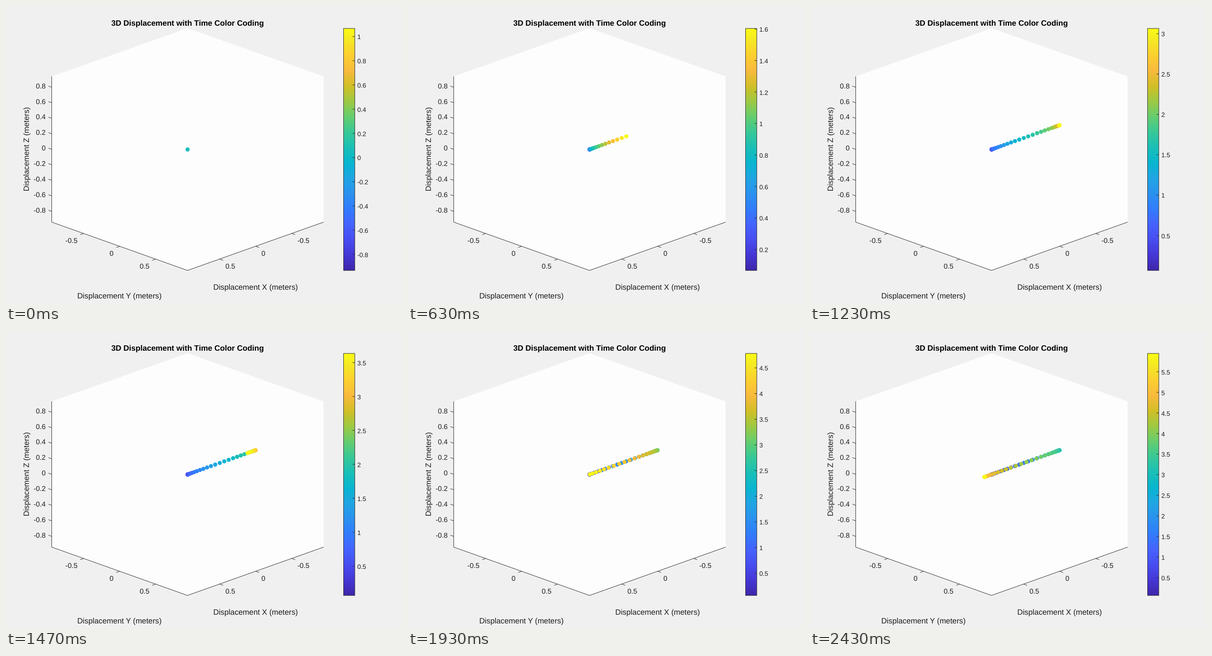
Recreate the animation shown at these times as an HTML page. Size 864 px wide and 648 px high, loop 2.46 s.

```html
<!DOCTYPE html>
<html lang="en">
<head>
<meta charset="utf-8">
<title>3D Displacement</title>
<style>
  html, body { margin: 0; width: 100%; height: 100%; overflow: hidden; background: #f0f0f0; }
  svg { display: block; width: 864px; height: 648px; }
  text { font-family: "Liberation Sans", Arial, sans-serif; fill: #1c1c1c; text-rendering: geometricPrecision; }
  .line { fill: none; stroke: #262626; stroke-width: 1; }
</style>
</head>
<body>
<svg id="stage" viewBox="0 0 864 648">
  <defs><linearGradient id="map" x1="0" y1="1" x2="0" y2="0"></linearGradient></defs>
  <rect width="864" height="648" fill="#f0f0f0"/>
  <path d="M396 48.5L693 153.5V471.5L396 577L100 471.5V153.5Z" fill="#fdfdfe"/>
  <path class="line" d="M99.7 153.5V471.5L396 577L693 471.5"/>
</svg>
<script>
const LOOP = 2460, LAST = 73, SLOPE = 0.357;
const BAR = { x: 736.5, y: 49, w: 24.5, h: 528 };
const STOPS = ("3e26a8 4537d5 484df0 4563fd 327cfc 2b91ef 20a5e3 08b5d0 19bfb6 " +
  "37c897 64cd6f 9dc943 d1bf27 f8ba3d fccf30 f5e924 f9fb15").split(" ")
  .map((hex, i) => ({
    at: Math.min(i * 4, 63) / 63,
    rgb: [0, 2, 4].map(n => parseInt(hex.substr(n, 2), 16))
  }));

// [step, horizontal offset] and [step, seconds]
const PATH = [[0, 0], [6, 0.3], [9, 6.3], [11, 14.5], [13, 27], [16, 51], [19, 80],
  [22, 108], [26, 136], [29, 144.6], [33, 148], [38, 148], [41, 143], [44, 131],
  [47, 108], [50, 76], [54, 31.5], [58, 0.5], [61, -11], [64, -15.3], [73, -15.5]];
const CLOCK = [[0, 0.067], [11, 0.95], [26, 2.176], [37, 3.065], [50, 4.123],
  [58, 4.781], [73, 5.945]];

const stage = document.getElementById("stage");

function add(parent, tag, attrs, text) {
  const el = document.createElementNS("http://www.w3.org/2000/svg", tag);
  for (const name in attrs) el.setAttribute(name, attrs[name]);
  if (text !== undefined) el.textContent = text;
  parent.appendChild(el);
  return el;
}

function label(parent, text, x, y, size, anchor = "start", extra = {}) {
  add(parent, "text", { x, y: y + size * 0.36, "font-size": size, "text-anchor": anchor, ...extra }, text);
}

function tick(parent, x, y, dx, dy) {
  add(parent, "path", { class: "line", d: `M${x} ${y}l${dx} ${dy}` });
}

function segment(knots, x) {
  let i = 0;
  while (i < knots.length - 2 && x > knots[i + 1][0]) i++;
  return i;
}

function linear(knots, x) {
  const i = segment(knots, x), [a, p] = knots[i], [b, q] = knots[i + 1];
  return p + (q - p) * (x - a) / (b - a);
}

// Monotone cubic through the knots
function smooth(knots, x) {
  const i = segment(knots, x), [a, p] = knots[i], [b, q] = knots[i + 1];
  const slope = j => j < 0 || j > knots.length - 2 ? 0 :
    (knots[j + 1][1] - knots[j][1]) / (knots[j + 1][0] - knots[j][0]);
  const tangent = j => {
    const l = slope(j - 1), r = slope(j);
    return l * r > 0 ? 2 * l * r / (l + r) : 0;
  };
  const w = b - a, u = (x - a) / w, v = 1 - u;
  return p * v * v * (1 + 2 * u) + q * u * u * (1 + 2 * v) +
    w * u * v * (tangent(i) * v - tangent(i + 1) * u);
}

function color(f) {
  let i = 0;
  while (i < STOPS.length - 2 && f > STOPS[i + 1].at) i++;
  const a = STOPS[i], b = STOPS[i + 1], u = (f - a.at) / (b.at - a.at);
  return `rgb(${a.rgb.map((c, n) => Math.round(c + (b.rgb[n] - c) * u))})`;
}

// Smallest 1-2-5 step that keeps the scale below twelve intervals
function niceStep(range) {
  for (let e = -3; ; e++)
    for (const m of [1, 2, 5])
      if (range / (m * 10 ** e) < 12) return m * 10 ** e;
}

function drawAxes() {
  label(stage, "3D Displacement with Time Color Coding", 396.2, 36.8, 17.05, "middle",
    { "font-weight": "bold", style: "fill:#000" });
  for (let i = -4; i <= 4; i++) {
    const y = 312.8 - i * 33.85;
    tick(stage, 100, y, -7.5, -2.7);
    label(stage, +(i / 5).toFixed(1), 86.6, y - 3.2, 15.3, "end");
  }
  for (const v of [-0.5, 0, 0.5]) {
    const d = v * 157, y = 524.2 + v * 56;
    tick(stage, 248 + d, y, -7.5, 2.7);
    label(stage, v, 234.4 + d, y + 15.6, 15.3, "end");
    tick(stage, 544.8 - d, y, 7.5, 2.7);
    label(stage, v, 557.2 - d, y + 15.6, 15.3);
  }
  label(stage, "Displacement Y (meters)", 247.5, 631.6, 16.8, "middle");
  label(stage, "Displacement X (meters)", 544.6, 613, 16.8, "middle");
  label(stage, "Displacement Z (meters)", 0, 0, 16.8, "middle",
    { transform: "translate(43.7 312.5) rotate(-90)" });

  const map = document.getElementById("map");
  for (const s of STOPS) add(map, "stop", { offset: s.at, "stop-color": `rgb(${s.rgb})` });
  add(stage, "rect", { x: BAR.x, y: BAR.y, width: BAR.w, height: BAR.h, fill: "url(#map)",
    stroke: "#262626", "stroke-width": 1 });
}

drawAxes();
const scale = add(stage, "g", {});
const points = Array.from({ length: LAST + 1 }, (_, k) => {
  const d = smooth(PATH, k);
  return {
    time: linear(CLOCK, k),
    dot: add(stage, "circle", { cx: 396.2 + d, cy: 313 - d * SLOPE, r: 4.5 })
  };
});

function drawScale(lo, hi) {
  scale.textContent = "";
  const step = niceStep(hi - lo);
  for (let i = Math.ceil(lo / step); i * step <= hi; i++) {
    const y = BAR.y + BAR.h * (hi - i * step) / (hi - lo);
    tick(scale, BAR.x + BAR.w, y, -5, 0);
    label(scale, +(i * step).toFixed(3), 766.4, y + 0.8, 13.9);
  }
}

function show(k) {
  const first = points[0].time, now = points[k].time;
  const lo = k ? first : first - 1, hi = k ? now : first + 1;
  points.forEach(({ time, dot }, i) => {
    dot.style.display = i <= k ? "" : "none";
    if (i <= k) dot.setAttribute("fill", color((time - lo) / (hi - lo)));
  });
  drawScale(lo, hi);
}

const start = performance.now();
let shown = -1;

function run() {
  const t = (performance.now() - start) % LOOP;
  let k = 0;
  while (k < LAST && Math.round((k + 1) * 10 / 3) * 10 <= t) k++;
  if (k !== shown) show(shown = k);
  requestAnimationFrame(run);
}
run();
</script>
</body>
</html>
```
